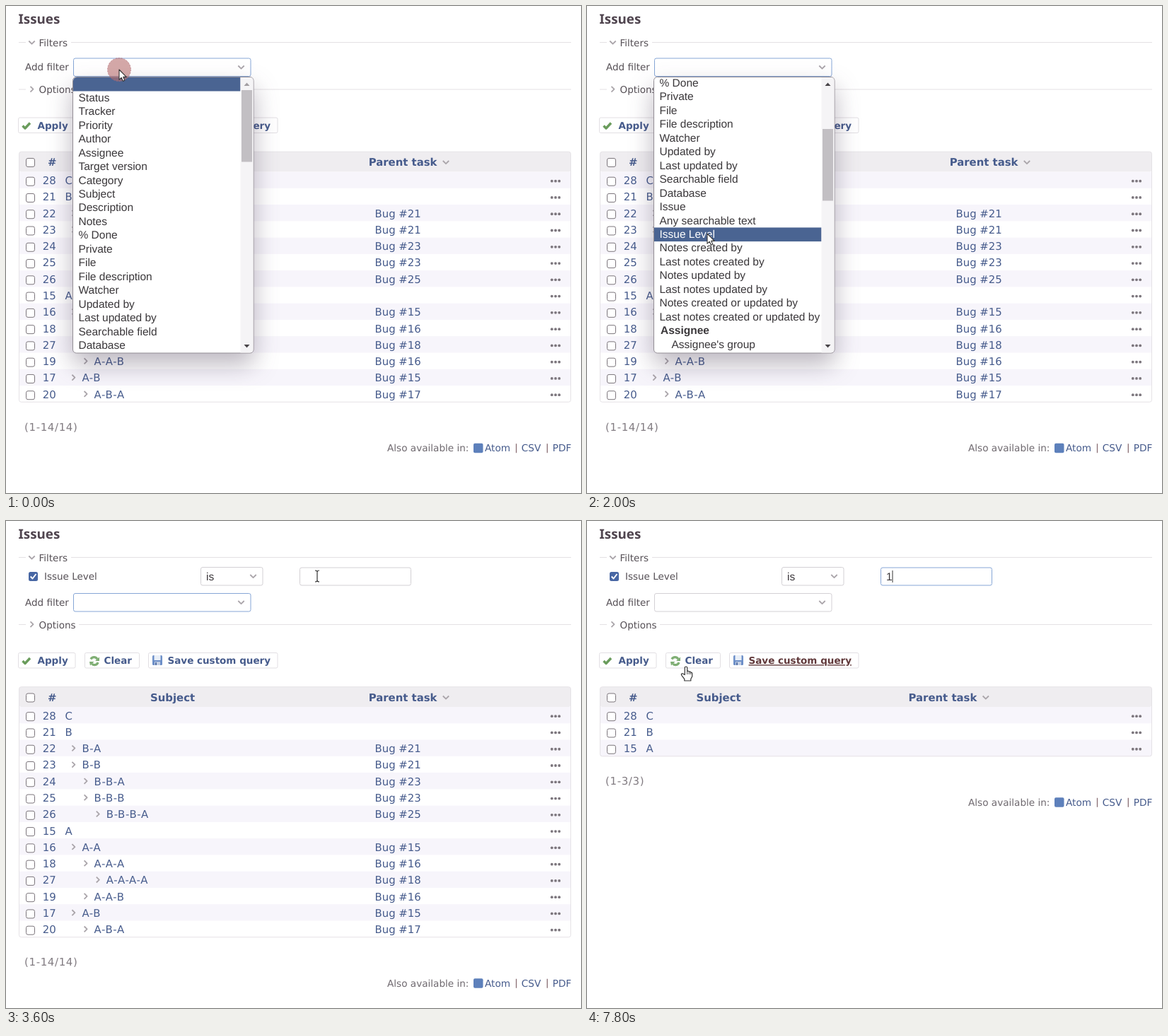
Recreate the animation shown at these times as an HTML page. Size 813x689 px, loop 8 s.

```html
<!DOCTYPE html>
<html lang="en">
<head>
<meta charset="utf-8">
<title>Issues</title>
<style>
  html, body { margin: 0; width: 100%; height: 100%; overflow: hidden; background: #fff; }
  svg { display: block; width: 813px; height: 689px; }
  text { font-family: "DejaVu Sans", Verdana, sans-serif; white-space: pre; text-rendering: geometricPrecision; }
  .title { font-family: "Noto Sans", sans-serif; font-weight: bold; }
  .field { font-family: "Liberation Sans", Arial, sans-serif; }
  .bold { font-weight: bold; }
  .loose { letter-spacing: .62px; }
  .under { text-decoration: underline; }
  .popup { filter: drop-shadow(0 16px 17px rgba(60, 45, 70, .34)); }
</style>
</head>
<body>
<svg id="stage" viewBox="0 0 813 689"></svg>
<script>
const LOOP = 8000, STEP = 200;
const LINK = '#465b8c', LABEL = '#565056', BORDER = '#d3d0d4', FOCUS = '#86a6d6',
      HIGHLIGHT = '#4a6492', HOVER = '#61393b', RULE = '#e4e1e4';
const ROW = 23.27, OPTION = 19.46, SCROLL = 215.5, FILTER_HEIGHT = 28.5;

// id, subject, parent; depth follows from the subject
const issues = `28 C|21 B|22 B-A 21|23 B-B 21|24 B-B-A 23|25 B-B-B 23|26 B-B-B-A 25|15 A|16 A-A 15
|18 A-A-A 16|27 A-A-A-A 18|19 A-A-B 16|17 A-B 15|20 A-B-A 17`.split('|').map(row => row.trim().split(' '));

const options = ['', 'Status', 'Tracker', 'Priority', 'Author', 'Assignee', 'Target version', 'Category',
  'Subject', 'Description', 'Notes', '% Done', 'Private', 'File', 'File description', 'Watcher',
  'Updated by', 'Last updated by', 'Searchable field', 'Database', 'Issue', 'Any searchable text',
  'Issue Level', 'Notes created by', 'Last notes created by', 'Notes updated by',
  'Last notes updated by', 'Notes created or updated by', 'Last notes created or updated by',
  '*Assignee', "-Assignee's group", "-Assignee's role"];

// time, x, y
const pointerPath = [
  [0, 160, 90], [200, 160, 90], [400, 163, 140], [600, 164, 165], [1000, 164, 165], [1800, 170, 322],
  [2200, 170, 322], [2600, 241, 115], [3400, 440, 78], [4600, 440, 78], [4800, 300, 130],
  [5000, 91, 201], [5400, 81, 199], [6600, 81, 199], [6800, 86, 201], [7000, 300, 130],
  [7200, 440, 78], [7600, 440, 78], [7800, 140, 206]];
const clicks = [[0, 160, 90], [2200, 170, 322], [3800, 440, 78], [5800, 78, 200], [7200, 440, 78]];

const rect = (x, y, w, h, fill, stroke = 'none', r = 0) =>
  `<rect x="${x}" y="${y}" width="${w}" height="${h}" rx="${r}" fill="${fill}" stroke="${stroke}"/>`;
const path = (d, stroke, width = 1, fill = 'none', at = [0, 0]) =>
  `<path d="${d}" transform="translate(${at})" stroke="${stroke}" stroke-width="${width}" fill="${fill}" stroke-linejoin="round"/>`;
const text = (x, middle, str, size, fill, cls = '') =>
  `<text x="${x}" y="${middle + size * .365}" font-size="${size}" fill="${fill}" class="${cls}">${str}</text>`;
const label = (x, y, str) => text(x, y, str, 13.5, LABEL);
const down = (x, y) => path('M-4.2-2L0 2.2L4.2-2', '#aaa5aa', 1.8, 'none', [x, y]);
const right = (x, y) => path('M-2-4.2L2-.3L-2 3.6', '#aaa5aa', 1.8, 'none', [x, y]);
const checkbox = y => rect(28.5, y - 6, 12, 12, '#fff', '#7c767c', 2.5);

function pointerAt(t) {
  const next = pointerPath.findIndex(key => key[0] > t);
  if (next < 0) return pointerPath.at(-1).slice(1);
  const [t0, x0, y0] = pointerPath[next - 1], [t1, x1, y1] = pointerPath[next];
  const k = (t - t0) / (t1 - t0);
  return [x0 + (x1 - x0) * k, y0 + (y1 - y0) * k];
}

function stateAt(t) {
  return {
    t, pointer: pointerAt(t),
    listOpen: t < 2400,
    filtered: t >= 6000,
    scroll: SCROLL * Math.min(1, Math.max(0, (t - 400) / 400)),
    focused: (t >= 3800 && t < 5800) || t >= 7200,
    selectFocused: t < 3800,
    caret: (t >= 3800 && t < 4800) || t >= 7200,
    value: t < 4200 || t === 7400 ? '' : t < 7400 ? '0' : '1',
    hover: (t >= 5000 && t < 6000) || t === 6800 ? 'Apply' : t >= 7800 ? 'Save custom query' : ''
  };
}

const fieldset = (y, name, arrow) =>
  path(`M18 ${y}H28M${name === 'Filters' ? 92 : 103} ${y}H799`, RULE) + arrow(36.5, y) + label(46.5, y + .3, name);

function select(x, y, w, str, focused) {
  return rect(x + .5, y - 12.5, w, 25.5, '#fff', focused ? FOCUS : BORDER, 2.5) +
    text(x + 8, y, str, 15.5, '#3c383c', 'field') + down(x + w - 13, y);
}

function filterRow(s) {
  return rect(32, 72, 13, 13, '#4867a4', 'none', 2.5) + path('M34.7 78.5L37.5 81.5L42.5 75', '#fff', 1.9) +
    label(54, 78, 'Issue Level') + select(275, 78, 87.5, 'is') +
    rect(415.5, 66, 157, 25, '#fff', s.focused ? FOCUS : BORDER, 2.5) +
    text(423, 78.2, s.value, 15.5, '#3c383c', 'field') +
    (s.caret ? path(`M${s.value ? 432 : 424.5} 70V87`, '#333') : '');
}

function button(x, w, str, hover) {
  const on = hover === str;
  return rect(x + .5, 186.5, w, 21.5, '#fff', '#e2dfe3', 2) +
    text(x + 27.5, 197.3, str, 13.5, on ? HOVER : LINK, 'bold' + (on ? ' under' : ''));
}

const buttonIcons =
  path('M23.5 198L27 201.5L34 194', '#6a9c5c', 3.4) +
  path('M120 195.5A5 5 0 0 1 129 195.5M130 200A5 5 0 0 1 121.5 202', '#7fae74', 3.2) +
  path('M126 198H132V192.5ZM118 199H124.5L119 204.5Z', 'none', 0, '#7fae74') +
  rect(207, 190, 14, 14, '#6d8fc8', 'none', 1.5) + rect(209.5, 190, 9, 7, '#e9eff8') +
  rect(210, 199, 8, 5, '#c3cfe4') + rect(211, 200, 2, 4, '#5572a8');

function issueRow([id, subject, parent], i) {
  const y = 275.2 + i * ROW, depth = subject.split('-').length - 1;
  const x = depth ? 90.2 + 17.2 * depth : 83.5;
  return (i % 2 ? '' : rect(19, 263 + i * ROW, 779, ROW, '#f7f5fb')) +
    checkbox(y + 1.5) + text(51.7, y, id, 14.9, LINK) +
    (depth ? right(x - 12, y) : '') + text(x, y, subject, 14.9, LINK, 'loose') +
    (parent ? text(521.5, y, `Bug #${parent}`, 14.9, LINK) : '') +
    [771.8, 777, 782.2].map(cx => `<circle cx="${cx}" cy="${y + 1}" r="1.9" fill="#7b757c"/>`).join('');
}

function table(filtered) {
  const rows = filtered ? issues.filter(issue => !issue[2]) : issues;
  const [subjectX, parentX] = filtered ? [154.5, 454.5] : [204, 512.7];
  const bottom = 263 + rows.length * ROW, n = rows.length;
  return rect(18.5, 235, 780, 28, '#efedf0', 'none', 3) + checkbox(250) +
    text(59, 249.5, '#', 14.9, LINK, 'bold') + text(subjectX, 249.5, 'Subject', 14.9, LINK, 'bold') +
    text(parentX, 249.5, 'Parent task', 14.9, LINK, 'bold') + down(parentX + 109.3, 249.5) +
    rows.map(issueRow).join('') + rect(18.5, 234.7, 780, bottom - 234.7, 'none', '#e5e2e6', 3) +
    text(26, bottom + 35.2, `(1-${n}/${n})`, 15, '#817b81', 'loose') + footer(bottom + 65);
}

function footer(y) {
  return text(539, y, 'Also available in:', 13.6, '#6f696f') + rect(661, y - 6.5, 13.5, 13.5, '#5d80bb', 'none', 2) +
    text(677, y + .2, 'Atom', 13.7, LINK) + text(728.7, y, 'CSV', 13.7, LINK) + text(772.8, y, 'PDF', 13.7, LINK) +
    path(`M721.5 ${y - 6}V${y + 7}M765.3 ${y - 6}V${y + 7}`, '#8b6f74', 1.3);
}

function optionList({ t, scroll, pointer }) {
  const active = t < 600 ? 0 : t < 1000 ? -1 : Math.floor((pointer[1] - 100.5 + scroll) / OPTION);
  const rows = options.map((name, i) => {
    const y = 109.7 + OPTION * i - scroll, group = name[0] === '*', child = name[0] === '-';
    return (i === active ? rect(95, y - 8.9, 236.5, 19.7, HIGHLIGHT) : '') +
      text(group ? 104 : child ? 119.5 : 102.5, y, group || child ? name.slice(1) : name, 15.5,
        i === active ? '#fff' : '#3a373a', 'field' + (group ? ' bold' : ''));
  }).join('');
  return `<clipPath id="list"><rect x="95" y="101" width="255" height="389.5" rx="5"/></clipPath>
    <g class="popup">${rect(94.5, 100.5, 255.5, 390.5, '#fff', '#938e95', 5)}</g>
    <g clip-path="url(#list)">${rows}${rect(331.5, 101, 18, 390, '#f5f4f6')}
    ${rect(333, 119 + scroll * 55 / SCROLL, 15, 101.5, '#c2bfc3')}
    ${path('M336.5 113L340.5 108.5L344.5 113Z', 'none', 0, scroll ? '#484448' : '#a29ea2')}
    ${path('M336.5 479L340.5 483.5L344.5 479Z', 'none', 0, '#484448')}</g>`;
}

function ripple(t) {
  const click = clicks.find(([start]) => t >= start && t < start + 2 * STEP);
  if (!click) return '';
  const [start, x, y] = click, fresh = t === start;
  return `<circle cx="${x}" cy="${y}" r="${fresh ? 16.5 : 24}" fill="${fresh ? '#b86f6f' : '#b98a9c'}"
    fill-opacity="${fresh ? .6 : .24}" stroke="#b06a78" stroke-opacity="${fresh ? .6 : .4}" stroke-dasharray="2 2"/>`;
}

function cursor({ pointer, listOpen }) {
  const [x, y] = pointer;
  if (!listOpen && x > 415 && y > 65 && y < 92)
    return path('M-3-8Q0-8 0-6Q0-8 3-8M0-6V6M-3 8Q0 8 0 6Q0 8 3 8', '#333', 1.2, 'none', pointer);
  if (!listOpen && y > 186 && y < 210 && x < 384)
    return path(`M-1.7 11.5V1.7Q-1.7 0 0 0T1.7 1.7V6.5Q3.5 5.5 4.3 7.3Q6 6.5 6.6 8.2Q8.6 7.8 8.7 9.8V14
      L6.8 17.5V20H-2.2V17.7L-6.2 12.3Q-7.5 9.8-5 9.8Z`, '#333', 1.2, '#fff', pointer) +
      path('M1.7 6.5V11M4.3 7.5V11M6.6 8.5V11', '#333', .9, 'none', pointer);
  return path('M0 0V14.2L3.2 11.3L5.4 16.3L7.8 15.2L5.7 10.4H10.2Z', '#333', 1.1, '#fff', pointer);
}

function render(s) {
  return text(17.5, 18.3, 'Issues', 18.8, '#50454f', 'title') + fieldset(51.5, 'Filters', down) +
    (s.listOpen ? '' : filterRow(s)) +
    `<g transform="translate(0 ${s.listOpen ? -FILTER_HEIGHT : 0})">` +
    label(27, 115, 'Add filter') + select(95, 115, 250.5, '', s.selectFocused) +
    fieldset(146.5, 'Options', right) +
    button(17, 80.5, 'Apply', s.hover) + button(111, 77, 'Clear', s.hover) +
    button(201, 182.5, 'Save custom query', s.hover) + buttonIcons + table(s.filtered) + '</g>' +
    (s.listOpen ? optionList(s) : '') + ripple(s.t) + cursor(s);
}

const stage = document.getElementById('stage');
let shown = -1;
function tick() {
  const t = Math.floor(performance.now() % LOOP / STEP) * STEP;
  if (t !== shown) stage.innerHTML = render(stateAt(shown = t));
  requestAnimationFrame(tick);
}
tick();
</script>
</body>
</html>
```
